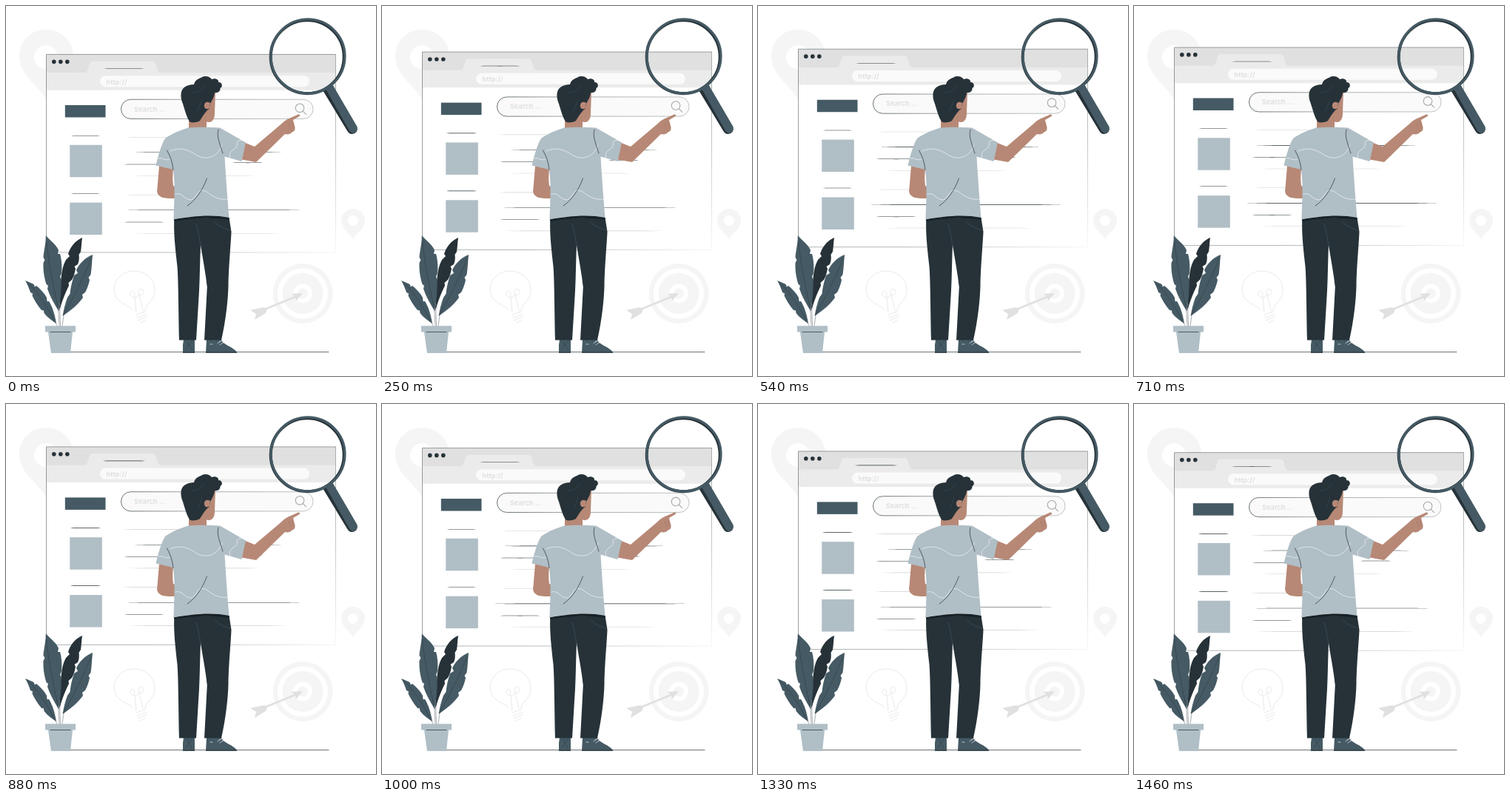
Write an HTML page that moves like this. It is 500 px wide and 500 px high and loops after 1.5 s.

```html
<!DOCTYPE html>
<html lang="en">
<head>
<meta charset="utf-8">
<title>Search illustration</title>
<style>
html, body { margin: 0; width: 100%; height: 100%; overflow: hidden; background: #fff; }
svg { display: block; width: 100vw; height: 100vh; }
text { font-family: Inter, "Open Sans", sans-serif; font-weight: 700; fill: #e0e0e0; }
.slate { fill: #455a64; }
.dark { fill: #263238; }
.pale { fill: #b0bec5; }
.skin { fill: #b78876; }
.faint { fill: #f5f5f5; }
.grey { fill: #e0e0e0; }
.ink, .thread, .sketch, .vein { fill: none; stroke-linecap: round; stroke-linejoin: round; }
.ink { stroke: #263238; stroke-width: .7; }
.thread { stroke: #fff; stroke-width: .6; }
.sketch { stroke: #e0e0e0; stroke-width: .7; }
.vein { stroke: #263238; stroke-width: .4; }
</style>
</head>
<body>
<svg viewBox="0 0 500 500">
  <defs>
    <linearGradient id="fadeX" gradientUnits="userSpaceOnUse" x1="54" y1="0" x2="446" y2="0">
      <stop offset=".35" stop-color="#263238" stop-opacity=".5"/>
      <stop offset="1" stop-color="#263238" stop-opacity=".06"/>
    </linearGradient>
    <linearGradient id="fadeY" gradientUnits="userSpaceOnUse" x1="0" y1="66" x2="0" y2="334">
      <stop offset=".3" stop-color="#263238" stop-opacity=".5"/>
      <stop offset="1" stop-color="#263238" stop-opacity=".05"/>
    </linearGradient>
    <linearGradient id="fadeBox" gradientUnits="userSpaceOnUse" x1="155" y1="0" x2="416" y2="0">
      <stop offset="0" stop-color="#263238"/>
      <stop offset=".35" stop-color="#263238" stop-opacity=".6"/>
      <stop offset="1" stop-color="#263238" stop-opacity=".4"/>
    </linearGradient>
  </defs>

  <!-- backdrop -->
  <g class="faint" fill-rule="evenodd">
    <path d="M54 32C33 32 18 48 18 68C18 93 43 106 54 126C65 106 91 93 91 68C91 48 75 32 54 32ZM54 53A16 16 0 1 1 54 85A16 16 0 1 1 54 53Z"/>
    <path d="M469 274C460 274 453 281 453 290C453 301 464 306 469 315C474 306 485 301 485 290C485 281 478 274 469 274ZM469 283A7 7 0 1 1 469 297A7 7 0 1 1 469 283Z"/>
  </g>
  <circle cx="401" cy="388.500" r="40.500" class="faint"/>
  <circle cx="401" cy="388.500" r="34" fill="#fff"/>
  <circle cx="401" cy="388.500" r="27.500" class="faint"/>
  <circle cx="401" cy="388.500" r="13" fill="#fff"/>
  <circle cx="401" cy="388.500" r="7" class="faint"/>
  <g class="grey">
    <path d="M347 409.500L391 391.500L392 394L348 412Z"/>
    <path d="M401 388L386 389L390 393L392 398.500Z"/>
    <path d="M330 411L349 407L353 410L351 415L336 424L338 416Z"/>
  </g>
  <g class="sketch">
    <path d="M171 411C168 405 150 402 147 389C143 372 156 358 173 358C190 358 202 371 201 386C200 400 187 403 188 412"/>
    <path d="M176 414L174 394C169 393 166 389 169 386C173 383 175 389 173 394C179 395 180 389 179 385C180 381 186 382 186 386C186 390 182 391 180 390L185 412"/>
    <path d="M176 417L188 413M177 421L190 417M178 425L190 420M181 428L188 425"/>
  </g>

  <!-- browser -->
  <g id="win">
    <rect x="54.500" y="66" width="391" height="267.500" fill="#fff"/>
    <rect x="54.500" y="66" width="391" height="25" class="grey"/>
    <path d="M54.500 90.500H106Q109 90.500 110 87L113 78Q114 75 117 75H198Q201 75 202 78L205 87Q206 90.500 209 90.500H445.500V114H54.500Z" fill="#ebebeb"/>
    <rect x="127" y="94.500" width="283" height="15" rx="7.500" fill="#fafafa"/>
    <g class="dark">
      <circle cx="64.800" cy="75.700" r="2.800"/><circle cx="73.800" cy="75.700" r="2.800"/><circle cx="82.800" cy="75.700" r="2.800"/>
    </g>
    <text x="135.500" y="106" font-size="9.100">http://</text>
    <path class="ink" stroke-opacity=".65" d="M54.500 333.500V65.800H445.500"/>
    <rect x="54.500" y="333" width="391" height=".7" fill="url(#fadeX)"/>
    <rect x="445.200" y="66" width=".7" height="267.500" fill="url(#fadeY)"/>
    <rect x="155.500" y="126.600" width="259.500" height="26.200" rx="13.100" fill="#fafafa" stroke="url(#fadeBox)" stroke-width=".7"/>
    <text x="173" y="143" font-size="9.200">Search ...</text>
    <g fill="none" stroke="#a6a9ab" stroke-width="1.100" stroke-linecap="round">
      <circle cx="397" cy="138.200" r="5.800"/><path d="M401.300 142.500L405.500 146.800"/>
    </g>
    <rect x="79.800" y="134.300" width="54.700" height="16.500" class="slate"/>
    <rect x="86.200" y="188.100" width="43.600" height="43.500" class="pale"/>
    <rect x="86.200" y="266" width="43.600" height="43.500" class="pale"/>
    <g id="rules"></g>
  </g>

  <path class="ink" d="M86 467.600H436"/>

  <!-- plant -->
  <path class="vein" d="M70.500 405L72 432M72.500 405L73.500 432M79 412L76 432M65 424L69 432"/>
  <path class="dark" d="M103 313C94 317 87 325 84 335L86 338L81 343C76 352 75 362 74 374L72 412C76 398 80 388 85 378L84.500 374L89 370C92 365 93 360 94 355L92.500 352L97 349C99 345 99 340 98.500 336L101 332C102 326 102 319 103 313Z"/>
  <path class="slate" d="M54 310C54 320 51 331 50.500 340L52.500 343L50.500 347C50 358 52 368 54.500 376L57 378L56 382C59 392 65 402 71 412C74 397 75 384 74.500 369L73 366L75 361C76 352 75 342 73 335L70 335L71 330C67 321 59 317 54 310Z"/>
  <path class="slate" d="M117 336C107 340 99 348 95 357L97 361L92 364C89 373 87 382 86.500 389L83 394C80 402 78 410 76.500 419C88 411 98 403 104 394L103 390L107 387C110 381 112 376 113 370L111.500 367L114.500 363C116 354 116 345 117 336Z"/>
  <path class="slate" d="M26 371C29 376 31 381 33 387L36 388.500L35.500 391.500C39 399 43 405 48 411L51 411.500L51.500 415C56 421 62 425 68 429C66 417 63 407 58 399L55.500 399L55 394C51 387 46 382 41 378L39 379.500L37.500 376C34 374 30 373 26 371Z"/>
  <path class="vein" d="M54 312C57 350 66 385 71 412M102 316C89 342 79 375 73 408M116 339C106 365 92 392 78 417M28 373C43 386 56 406 66 427"/>
  <path class="pale" d="M53 432.300H94V440.500H90L87 469H61L57 440.500H53Z"/>
  <path class="ink" d="M60 440.500H87"/>

  <!-- person -->
  <path class="slate" d="M240 451H255V468.500H239V458Z"/>
  <path class="slate" d="M271 451H291C295 459 306 460 312 467.500V468.500H270Z"/>
  <path class="dark" d="M239 467.600H255V468.800H239ZM270 467.600H312V468.800H270Z"/>
  <path class="thread" d="M286 456L290 453M289 458L294 454M288 454C292 451 296 453 293 456M276 457H279"/>
  <path class="vein" d="M244 453L251 464M251 453L243 464"/>
  <path class="dark" d="M227.500 287C226 304 229 330 231.500 352C233 370 233 410 234 451.500H257L261 385C262 365 262 345 263 323C266 342 270 362 271.800 380L268 451.500H291C297 425 300 398 300.500 378C301 350 304 320 304.500 305L301.500 286Z"/>
  <path d="M257 294C260 306 262 316 263 325M281 291C287 297 294 301 303 303" fill="none" stroke="#455a64" stroke-width=".6"/>
  <path class="skin" d="M207 216L226 220C225 228 225 236 226 243L229 244V260C222 260 216 260 212 259C206 257 203 253 204.500 246Z"/>
  <path class="skin" d="M321 184L336 190L372 159.500C376 155 381 152 386 150.500L395 146.500C397 146 398 148 396.500 149L388 154L390.500 164C391 168 389 170 387 170C385 173 381 174 377 173L338 211L316 207Z"/>
  <path d="M386 157L389 165M382 159L385 167" fill="none" stroke="#9a6a5a" stroke-width=".4"/>
  <path class="skin" d="M247 150H271V166H247Z"/>
  <path class="skin" d="M258 118L283 115L282 145C282 153 279 157 274 157L256 154Z"/>
  <path class="dark" d="M249 157C244 152 242 140 237.500 128C234 113 240 107 254 106C256 98 263 98 266 95.500C272 94 276 96 278 99C282 97 288 99 287 103C293 103 293 110 289.500 111C290 115 286 118 282 117C282 121 279 127 276 132L274.500 139C269 143 266 149 262 155C259 157 253 158 249 157Z"/>
  <path class="skin" d="M276 131C271 128 267 131 268 136C269 140 272 140 275 138Z"/>
  <path d="M252 116C258 118 264 114 268 108M259 142L265 126" fill="none" stroke="#455a64" stroke-width=".4"/>
  <path class="pale" d="M246 164.500C256 163.500 274 163.500 289 164.500L324 184.500L318.500 210L295.500 203.500C297 230 299 258 301.500 287C276 282 249 284 226.500 289C227 268 229 243 226 221L202.500 215.500C206 201 210 187 215 179C223 173 235 168 246 164.500Z"/>
  <path d="M227 288.500C250 284 278 281 301.500 286V289C278 285 250 286.500 227 291Z" fill="#172126"/>
  <path class="thread" d="M206 206C212 204 215 210 221 207M222 196C237 189 249 196 258 202C273 210 287 202 292 188M303 205C298 194 315 195 312 185C313 181 317 181 319 182M229 254C238 251 241 262 250 262C257 260 258 251 264 249C274 249 279 263 299 261"/>
  <path class="ink" d="M217.500 195C222 203 225 211 226 221M287 167C284 177 290 188 293 199M271.500 233C266 248 257 262 245 270"/>

  <!-- magnifier -->
  <path class="dark" d="M428.700 115L440 107.500L474 164C476 169 472 173 467.500 173C464.500 173 462.500 171 461 168.500Z"/>
  <path class="slate" d="M432.500 113L441.500 106.500L474.500 163C476 168 473 172 469 172C466.500 172 465.500 170 464 168.500Z"/>
  <circle cx="407.200" cy="68.700" r="49.500" fill="none" stroke="#263238" stroke-width="4"/>
  <circle cx="408" cy="67.900" r="50" fill="none" stroke="#455a64" stroke-width="3.200"/>
</svg>
<script>
const SVG = "http://www.w3.org/2000/svg";
const win = document.getElementById("win");
const rules = document.getElementById("rules");
const PERIOD = 1500, RISE = 10, LEAD = 25;

// Hairline with slightly tapered ends
function rule(x1, x2, y, color = "#263238", h = 0.42) {
  const p = document.createElementNS(SVG, "path");
  const inset = (x2 - x1) * 0.05, a = x1 + inset, b = x2 - inset;
  p.setAttribute("d", `M${x1} ${y}C${a} ${y - h} ${b} ${y - h} ${x2} ${y}C${b} ${y + h} ${a} ${y + h} ${x1} ${y}Z`);
  p.setAttribute("fill", color);
  rules.append(p);
}

const LIGHT = "#d0d0d0";
rule(131, 188, 84.8);
for (const dy of [0, 78]) {
  rule(87, 128, 175.6 + dy);
  rule(159, 250, 177.6 + dy, LIGHT);
  rule(158.5, 215, 214.4 + dy);
}
rule(166, 380, 198.2);
rule(305, 348, 212.2);
rule(167, 342, 229.8, LIGHT);
rule(153, 409, 276.2);
rule(167, 377, 307.6, LIGHT);

function draw(ms) {
  const phase = ((ms + LEAD) % PERIOD) / PERIOD;
  const y = -RISE * (1 - Math.abs(1 - 2 * phase));
  win.setAttribute("transform", `translate(0 ${y.toFixed(3)})`);
}

const start = performance.now();
function tick() {
  draw(performance.now() - start);
  requestAnimationFrame(tick);
}
draw(0);
requestAnimationFrame(tick);
</script>
</body>
</html>
```
